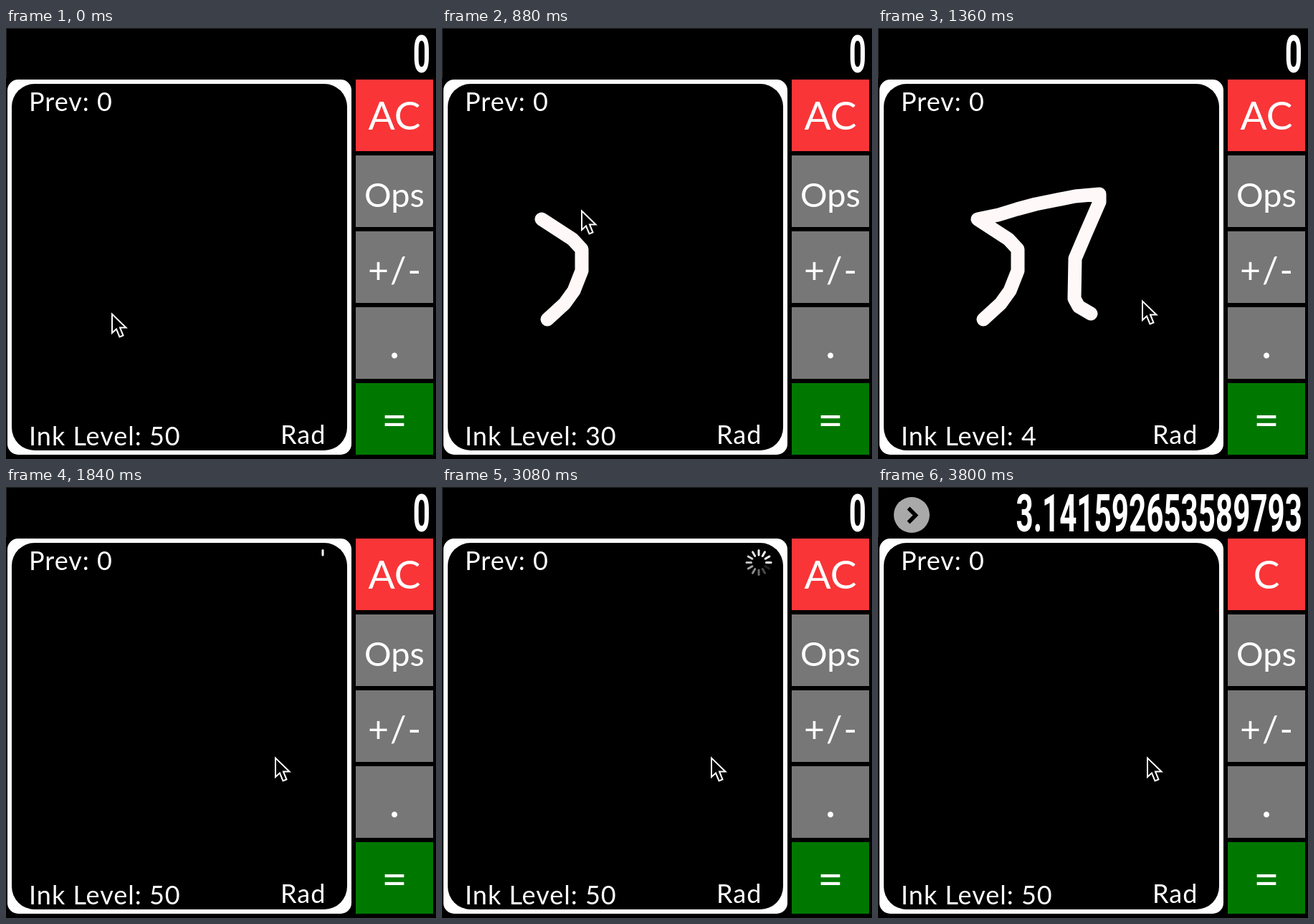
An HTML page for the animation above (3.84 s loop, 600 by 602 pixels).

```html
<!DOCTYPE html>
<html lang="en">
<head>
<meta charset="utf-8">
<title>Ink calculator</title>
<style>
  html, body { margin: 0; width: 100%; height: 100%; overflow: hidden; background: #000; }
  svg { display: block; width: 600px; height: 602px; }
  text { fill: #fff; font-family: Lato, sans-serif; }
  .label { font-size: 36px; letter-spacing: 1px; }
  .key { text-anchor: middle; }
  .value { font: 600 72px Roboto, sans-serif; text-anchor: end; }
</style>
</head>
<body>
<svg viewBox="0 0 600 602">
  <rect width="600" height="602"/>
  <path d="M.5 70V.5H600" fill="none" stroke="#242424"/>
  <g id="more">
    <circle cx="47" cy="39" r="25" fill="#a9a9a9"/>
    <path d="M42.5 29.5L52.500 39.500L42.500 49.500" fill="none" stroke="#000" stroke-width="5.500"/>
  </g>
  <g transform="translate(592 62) scale(.586 1)"><text id="value" class="value"></text></g>

  <rect x="2" y="72" width="480" height="524" rx="15" fill="#fff"/>
  <rect x="8" y="78" width="468" height="512" rx="32"/>
  <text class="label" x="32" y="116">Prev: 0</text>
  <text class="label" id="ink" x="32" y="583"></text>
  <text class="label" x="383" y="581">Rad</text>

  <g id="keys"></g>
  <g id="spinner" stroke="#fff" stroke-width="3" stroke-linecap="round"></g>
  <polyline id="stroke" fill="none" stroke="#fff8f8" stroke-width="19"
    stroke-linecap="round" stroke-linejoin="round"/>
  <path id="cursor" d="M1 2.500V29L7 23.500L11.500 34.500L16.500 32.500L12 21.500H20.500Z"
    fill="#000" stroke="#fff" stroke-width="2"/>
</svg>
<script>
const LOOP = 3840, STEP = 40;
const LAG = 110, CLEAR = 1800, INK_OUT = 1440;
const SPIN_START = 1820, SPIN_TURN = 1000, RESULT = 3200;

const $ = id => document.getElementById(id);
function add(parent, tag, attrs) {
  const el = document.createElementNS('http://www.w3.org/2000/svg', tag);
  for (const name in attrs) el.setAttribute(name, attrs[name]);
  return parent.appendChild(el);
}

// Rows of [time, value, ...], interpolated linearly.
function sample(rows, t) {
  const i = rows.findIndex(row => row[0] > t);
  if (i === 0) return rows[0].slice(1);
  if (i < 0) return rows[rows.length - 1].slice(1);
  const a = rows[i - 1], b = rows[i];
  const k = (t - a[0]) / (b[0] - a[0]);
  return a.slice(1).map((v, j) => v + (b[j + 1] - v) * k);
}

const pen = [
  [460, 147, 407], [560, 171, 385], [600, 184, 367], [650, 195, 339],
  [690, 195, 309], [725, 182, 295], [880, 139, 267], [940, 168, 261],
  [990, 194, 253], [1020, 220, 246], [1090, 275, 235], [1150, 309, 232],
  [1170, 309, 243], [1240, 289, 289], [1275, 275, 322], [1320, 274, 378],
  [1335, 280, 389], [1360, 297, 399], [1400, 325, 399], [1440, 350, 389],
  [1470, 368, 379], [1490, 375, 376]
];
const hover = [[200, 147, 397], [320, 147, 407]];
const inkLevel = [[460, 50], [560, 45], [880, 30], [1360, 4], [1440, 0]];

const keys = [
  ['AC', '#f93538', 55, 142, 0],
  ['Ops', '#777', 47, 250, 0],
  ['+/-', '#777', 50, 356, 2],
  ['.', '#777', 64, 461, 0],
  ['=', '#007800', 62, 570, 0]
].map(([label, fill, size, y, gap], i) => {
  add($('keys'), 'rect', { x: 488, y: 72 + 106 * i, width: 108, height: 100, fill });
  const text = add($('keys'), 'text', {
    class: 'key', x: 542 + gap / 2, y, 'font-size': size, 'letter-spacing': gap
  });
  text.textContent = label;
  return text;
});

const ticks = Array.from({ length: 12 }, (_, i) => add($('spinner'), 'path', {
  d: 'M0 -10.500V-17', transform: `translate(442 105.500) rotate(${30 * i})`
}));

function drawStroke(t) {
  const visible = t >= pen[0][0] && t < CLEAR;
  const end = Math.min(t, INK_OUT);
  const points = pen.filter(p => p[0] <= end).map(p => p.slice(1));
  points.push(sample(pen, end));
  $('stroke').setAttribute('points', visible ? points.join(' ') : '');
  const ink = t < CLEAR ? sample(inkLevel, t)[0] : 50;
  $('ink').textContent = 'Ink Level: ' + Math.round(ink);
}

function drawSpinner(t) {
  ticks.forEach((tick, i) => {
    const age = (t - SPIN_START) / SPIN_TURN - i / 12;
    const on = age >= 0 && t < RESULT;
    tick.setAttribute('opacity', on ? 1 - (age % 1) ** 2 : 0);
  });
}

function draw(t) {
  drawStroke(t);
  drawSpinner(t);
  const lead = t + LAG;
  const [x, y] = lead < pen[0][0] ? sample(hover, t) : sample(pen, lead);
  $('cursor').setAttribute('transform', `translate(${x} ${y})`);
  const done = t >= RESULT;
  $('value').textContent = done ? String(Math.PI) : '0';
  $('more').setAttribute('visibility', done ? 'visible' : 'hidden');
  keys[0].textContent = done ? 'C' : 'AC';
}

const start = performance.now();
function tick() {
  const t = (performance.now() - start) % LOOP;
  draw(Math.floor(t / STEP) * STEP);
  requestAnimationFrame(tick);
}
tick();
</script>
</body>
</html>
```
